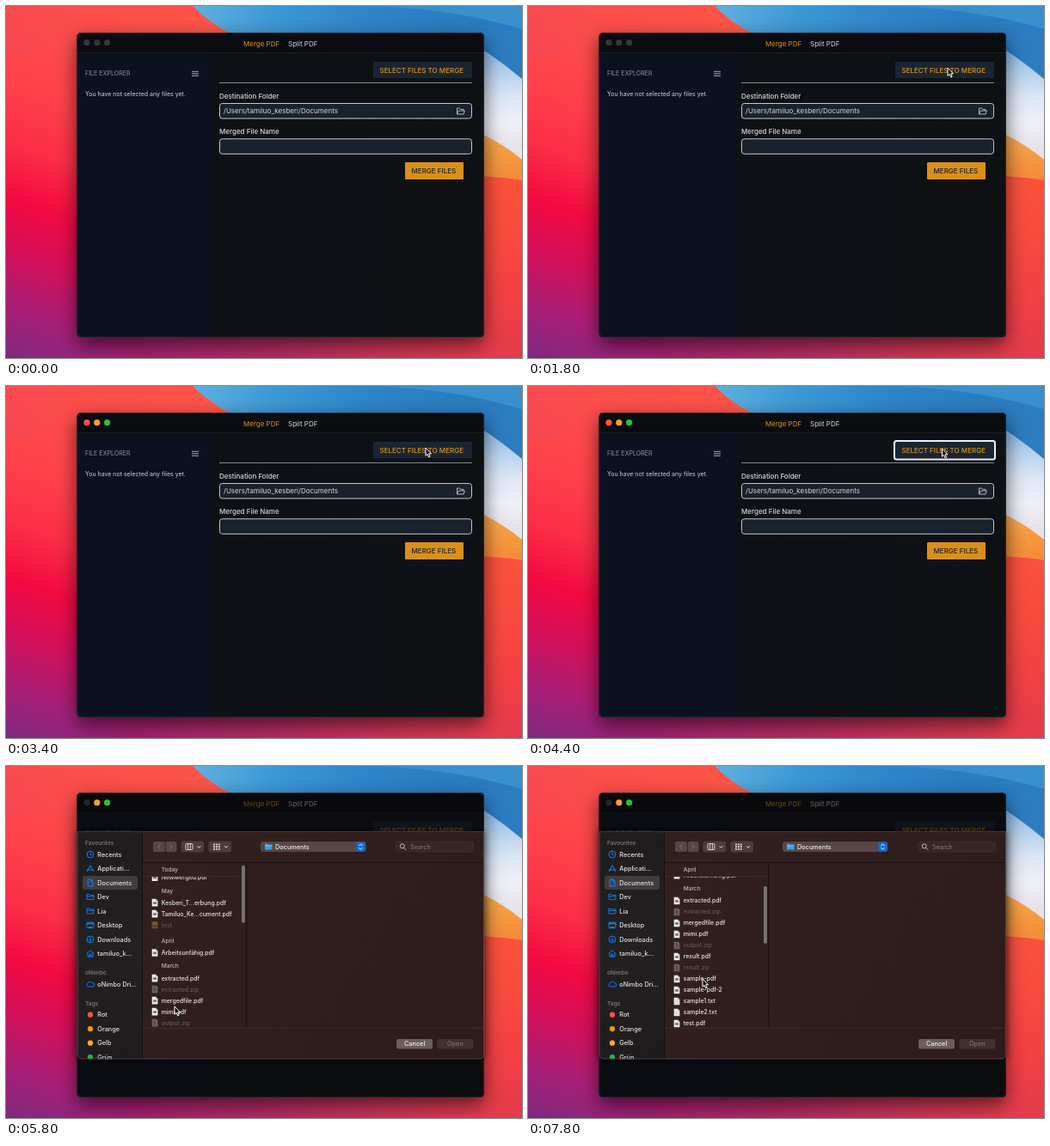
Write an HTML page with a canvas that moves like this. It is 600 by 410 pixels and loops after 8 s.

```html
<!DOCTYPE html>
<html lang="en">
<head>
<meta charset="utf-8">
<title>Merge PDF</title>
<style>
html, body { margin: 0; width: 100%; height: 100%; overflow: hidden; background: #000; }
canvas { display: block; width: 600px; height: 410px; }
</style>
</head>
<body>
<canvas id="stage" width="600" height="410"></canvas>
<script>
const c = document.getElementById('stage').getContext('2d');
const LOOP = 8000, STEP = 200;
const BLUE = '#0a84ff', AMBER = '#dc941c';
const WIN = [82.5, 31, 473.5, 355], SHEET = [82.5, 76, 473.5, 265.5];

// ---- helpers ----
function text(s, x, y, size, color, weight = 400) {
  c.font = `${weight} ${size}px Inter, "Noto Sans", sans-serif`;
  c.fillStyle = color;
  c.fillText(s, x, y + size * 0.36);
}
function box(x, y, w, h, r, fill, stroke, lw = 1) {
  c.beginPath();
  c.roundRect(x, y, w, h, r);
  if (fill) { c.fillStyle = fill; c.fill(); }
  if (stroke) { c.strokeStyle = stroke; c.lineWidth = lw; c.stroke(); }
}
function line(color, lw, ...p) {
  c.beginPath();
  for (let i = 0; i < p.length; i += 2) c.lineTo(p[i], p[i + 1]);
  c.strokeStyle = color;
  c.lineWidth = lw;
  c.stroke();
}
function dot(x, y, r, fill) {
  c.beginPath();
  c.arc(x, y, r, 0, 7);
  c.fillStyle = fill;
  c.fill();
}
function shape(path, fill, stroke, lw) {
  const p = new Path2D(path);
  if (fill) { c.fillStyle = fill; c.fill(p); }
  if (stroke) { c.strokeStyle = stroke; c.lineWidth = lw; c.stroke(p); }
}
function grad(x0, y0, x1, y1, ...colors) {
  const g = c.createLinearGradient(x0, y0, x1, y1);
  colors.forEach((k, i) => g.addColorStop(i / (colors.length - 1), k));
  return g;
}
function clipped(x, y, w, h, r, draw) {
  c.save();
  c.beginPath();
  c.roundRect(x, y, w, h, r);
  c.clip();
  draw();
  c.restore();
}
function at(x, y, draw) {
  c.save();
  c.translate(x, y);
  draw();
  c.restore();
}

// keys: [time, ...values]; eased between neighbours
function track(keys, t) {
  if (t <= keys[0][0]) return keys[0].slice(1);
  for (let i = 1; i < keys.length; i++) {
    const a = keys[i - 1], b = keys[i];
    if (t < b[0]) {
      const k = (t - a[0]) / (b[0] - a[0]), e = k * k * (3 - 2 * k);
      return a.slice(1).map((v, j) => v + (b[j + 1] - v) * e);
    }
  }
  return keys[keys.length - 1].slice(1);
}

// ---- wallpaper ----
function wallpaper() {
  c.fillStyle = grad(100, 0, -40, 400, '#fc5048', '#fd4a49', '#fd404a', '#fb2e47', '#f30a41', '#d20f5b', '#a61f76', '#7c2a80');
  c.fillRect(0, 0, 600, 410);
  c.fillStyle = grad(0, 0, 270, 0, 'rgba(240,70,96,.35)', 'rgba(252,80,76,.1)', 'rgba(255,98,64,.45)');
  c.fillRect(0, 0, 270, 60);
  c.fillStyle = grad(84, 0, 556, 0, 'rgba(150,32,112,0)', '#a8266c', '#b62c62', '#cc3557', '#e33b4c');
  c.fillRect(84, 370, 472, 40);
  c.fillStyle = grad(0, 190, 0, 410, '#fa533c', '#f94a3e', '#f34043', '#e33b4c');
  c.fillRect(555, 180, 45, 230);
  shape('M500 120 Q560 142 600 178 V203 Q575 198 500 196 Z', grad(0, 145, 0, 203, '#f9ae5c', '#f59a3e', '#f48a3a'));
  shape('M218 0 Q236 20 270 36 H500 V130 Q560 145 600 179 V0 Z', grad(0, 50, 0, 165, '#86b7e4', '#b9d2ee', '#dde7f5', '#eef0f7', '#e6e2ea'));
  shape('M218 0 Q236 20 270 36 H530 Q566 56 600 85 V0 Z', grad(218, 0, 600, 40, '#5fb0e0', '#3c98d4', '#2f86c9', '#2a7dc1', '#2c7cc0'));
  shape('M430 0 Q530 5 600 27 V0 Z', '#3a90cd');
}

// ---- app window ----
function windowFrame() {
  c.save();
  c.shadowColor = 'rgba(0,0,0,.6)';
  c.shadowBlur = 22;
  c.shadowOffsetY = 8;
  box(...WIN, 5, '#0d1116');
  c.restore();
}
function lights(colors) {
  colors.forEach((k, i) => dot(94 + i * 11.8, 42.7, 3.6, k));
}
function app(focus) {
  clipped(...WIN, 5, () => {
    c.fillStyle = grad(239, 0, 555, 0, '#0d1116', '#0e1114');
    c.fillRect(...WIN);
    c.fillStyle = '#0b111e';
    c.fillRect(82, 54, 157, 332);
    c.fillStyle = '#0a0c10';
    c.fillRect(82, 31, 474, 23);
    line('#1a1d22', 1, 82, 54.5, 556, 54.5);
  });
  text('Merge PDF', 276, 44.3, 8, AMBER);
  text('Split PDF', 328, 44.3, 8, '#d6d8da');

  text('FILE EXPLORER', 92, 78.9, 7.1, '#8c929a');
  for (const y of [76.3, 78.8, 81.3]) line('#a5abb2', 1, 216, y, 224, y);
  text('You have not selected any files yet.', 92, 102, 7, '#d2d5d9');

  box(427, 65, 115, 19, 1, '#1b2532');
  if (focus) box(426, 64, 117, 21.5, 2.5, null, '#eef1f5', 2);
  text('SELECT FILES TO MERGE', 434.5, 74.7, 8, AMBER, 500);
  line('#85888a', 1, 248, 89.5, 542, 89.5);

  text('Destination Folder', 248, 105, 8, '#d6d8da', 500);
  box(248.5, 113.5, 293, 17.5, 3, '#19212c', '#c3c8cd');
  text('/Users/tamiluo_kesberi/Documents', 253, 122.6, 8, '#d6d9dc');
  shape('M524.5 126 V119 H527.5 L528.7 120.4 H532 V122 M524.5 126 L526.3 122 H533.4 L532 126 Z', null, '#bfc5cb', 0.9);

  text('Merged File Name', 248, 146.5, 8, '#d6d8da', 500);
  box(248.5, 154.8, 293, 17.5, 3, '#19212c', '#c3c8cd');

  box(464, 182, 68, 20, 1, '#d9901b');
  text('MERGE FILES', 471.5, 192.2, 8, '#20201c', 500);
}
function border() {
  box(83, 31.5, 472.5, 354, 5, null, 'rgba(150,155,165,.2)', 0.8);
}

// ---- file sheet ----
const icons = {
  clock() { icons.ring(); line(BLUE, 1, 0, -2.3, 0, 0.4, 1.8, 0.4); },
  apps() { line(BLUE, 1, -3.6, 3.5, 0, -3.8, 3.6, 3.5); line(BLUE, 1, -4.2, 1.4, 4.2, 1.4); },
  page() { shape('M-2.8 -4 H0.8 L3 -1.8 V4 H-2.8 Z M0.6 -4 V-1.6 H3', null, BLUE, 1); },
  folder() { shape('M-4 3 V-3 H-1 L0 -2 H4 V3 Z M-4 -0.6 H4', null, BLUE, 0.9); },
  desktop() { box(-4, -3.4, 8, 6.6, 1, null, BLUE); line(BLUE, 1.2, -4, -1.8, 4, -1.8); line(BLUE, 1.4, -2, 2.2, 2, 2.2); },
  down() { icons.ring(); line(BLUE, 1, 0, -2.2, 0, 2); line(BLUE, 1, -1.6, 0.5, 0, 2.1, 1.6, 0.5); },
  ring() { c.beginPath(); c.arc(0, 0, 3.9, 0, 7); c.stroke(); },
  home() { shape('M-4.2 0 L0 -3.8 L4.2 0 M-3 -0.8 V3.6 H3 V-0.8 M-0.9 3.6 V1 H0.9 V3.6', null, BLUE, 1); },
  cloud() { shape('M-2.6 3 A2.1 2.1 0 0 1 -2.7 -1 A2.9 2.9 0 0 1 2.6 -1.2 A2.1 2.1 0 0 1 2.6 3 Z', null, BLUE, 1); }
};
const places = [
  ['clock', 'Recents', 103], ['apps', 'Applicati...', 119.5], ['page', 'Documents', 136],
  ['folder', 'Dev', 152.5], ['folder', 'Lia', 169], ['desktop', 'Desktop', 185.5],
  ['down', 'Downloads', 202], ['home', 'tamiluo_k...', 218.5], ['cloud', 'oNimbo Dri...', 254]
];
const tags = [['Rot', '#ff5149'], ['Orange', '#f5950c'], ['Gelb', '#ffa82c'], ['Grün', '#27b640']];

function sidebar() {
  c.fillStyle = grad(0, 76, 0, 341, '#1f1c1f', '#232021', '#1f1c1f');
  c.fillRect(82, 76, 76, 266);
  line('#120d0e', 1, 158.5, 76, 158.5, 342);
  text('Favourites', 92, 89.8, 6.6, '#7b7577', 600);
  text('oNimbo', 92, 241, 6.6, '#7b7577', 600);
  text('Tags', 92, 276.3, 6.6, '#7b7577', 600);
  box(89, 128, 64, 16, 3, '#413d3f');
  for (const [icon, name, y] of places) {
    at(98, y, () => { c.strokeStyle = BLUE; c.lineWidth = 1; icons[icon](); });
    text(name, 106.3, y, 7.3, '#e6e3e3', 500);
  }
  tags.forEach(([name, color], i) => {
    const y = 289.7 + i * 16.5;
    dot(98, y, 3.1, color);
    text(name, 106.3, y, 7.3, '#e6e3e3', 500);
  });
}

const PIN = 121;
const sections = [
  ['Today', PIN, 139.5, ['NewMerged.pdf']],
  ['May', 155.3, 169, ['Kesberi_T...erbung.pdf', 'Tamiluo_Ke...cument.pdf', 'test']],
  ['April', 213.3, 227.3, ['Arbeitsunfähig.pdf']],
  ['March', 243, 257, ['extracted.pdf', 'extracted.zip', 'mergedfile.pdf', 'mimi.pdf', 'output.zip',
    'result.pdf', 'result.zip', 'sample-pdf', 'sample-pdf-2', 'sample1.txt', 'sample2.txt', 'test.pdf']]
];

function fileIcon(name, y) {
  at(173, y, () => {
    if (name === 'test') {
      box(-3.5, -4, 7, 8, 0.5, '#6b5426');
      line('#3c2a1c', 0.9, -3.5, 1.5, 3.5, 1.5);
      line('#92783a', 0.9, -2.5, -2, 2.5, -2);
      return;
    }
    const zip = name.endsWith('.zip');
    shape('M-3.3 -4.3 H1.2 L3.4 -2 V4.3 H-3.3 Z', zip ? '#6c6061' : '#eeecec');
    shape('M1.2 -4.3 V-2 H3.4 Z', zip ? '#8a7e7e' : '#b3b0b1');
    if (zip) line('#413130', 1, 0, -3, 0, 2.6);
    else if (name.endsWith('.txt')) for (const k of [-1, 0.7, 2.4]) line('#b9b5b5', 0.6, -2, k, 2.2, k);
    else { c.fillStyle = '#686b78'; c.fillRect(-1.8, -0.8, 3.7, 2.5); }
  });
}

function list(scroll) {
  const header = (title, y) => text(title, 180.7, y, 6.5, '#b2a8a7', 600);
  clipped(159, 129, 120, 177, 0, () => {
    for (const [title, headY, rowY, files] of sections) {
      header(title, headY - scroll);
      files.forEach((name, i) => {
        const y = rowY + i * 13 - scroll;
        fileIcon(name, y);
        const dim = name === 'test' || name.endsWith('.zip');
        text(name, 180.7, y, 6.9, dim ? '#64575a' : '#ece8e8', 500);
      });
    }
  });
  // the newest section that passed the top stays pinned
  const pinned = sections.filter(s => s[1] - scroll <= PIN).pop();
  header(pinned[0], PIN);
  line('#463432', 0.8, 159, 128.7, 279, 128.7);
  if (scroll > 0) box(274, 113 + scroll * 0.27, 4, 67, 2, '#786f70');
}

function chevron(x, y) {
  line('#e8e3e3', 1, x - 1.9, y - 1, x, y + 1, x + 1.9, y - 1);
}
function toolbar() {
  box(171, 88, 14, 12, 2.5, '#554746');
  box(185.5, 88, 13, 12, 2.5, '#554746');
  line('#3a2827', 0.8, 185.2, 88, 185.2, 100);
  line('#857877', 1, 179.2, 91.3, 176.7, 94, 179.2, 96.7);
  line('#857877', 1, 190.8, 91.3, 193.3, 94, 190.8, 96.7);

  box(203.5, 87.5, 26.5, 13, 2.5, '#4c3c3b');
  box(209, 90.5, 8, 7, 1, null, '#e8e3e3', 0.9);
  line('#e8e3e3', 0.9, 211.7, 90.5, 211.7, 97.5);
  line('#e8e3e3', 0.9, 214.4, 90.5, 214.4, 97.5);
  chevron(224.5, 94.2);

  box(235.5, 87.5, 26.5, 13, 2.5, '#4c3c3b');
  c.fillStyle = '#dcd6d6';
  for (let i = 0; i < 9; i++) c.fillRect(241 + (i % 3) * 2.9, 90.5 + Math.floor(i / 3) * 2.7, 2, 1.8);
  chevron(256, 94.2);

  box(296, 88, 122.5, 12, 3, '#564746');
  shape('M301 97.5 V90.5 H304 L305 91.6 H309.5 V97.5 Z', '#2fa4ea');
  line('#7fcdf8', 0.8, 301, 93, 309.5, 93);
  text('Documents', 313, 94, 7.3, '#f0ecec', 500);
  box(407.5, 88.8, 10, 10.4, 2.5, '#0b6fe0');
  line('#fff', 1, 410.5, 92.9, 412.5, 90.9, 414.5, 92.9);
  line('#fff', 1, 410.5, 95.2, 412.5, 97.2, 414.5, 95.2);

  box(453.5, 88, 90, 12, 3, '#362625', '#433130', 0.8);
  c.beginPath();
  c.arc(460.8, 93.3, 2.5, 0, 7);
  c.strokeStyle = '#c9c1c0';
  c.lineWidth = 1;
  c.stroke();
  line('#c9c1c0', 1, 462.6, 95.2, 465, 97.7);
  text('Search', 470, 94, 7.2, '#857978');
}

function sheet(scroll) {
  const corners = [0, 0, 5, 5];
  clipped(...WIN, 5, () => {
    c.fillStyle = 'rgba(10,9,10,.55)';
    c.fillRect(...WIN);
  });
  lights(['#24272a', '#f5a32b', '#27c13f']);
  c.save();
  c.shadowColor = 'rgba(0,0,0,.6)';
  c.shadowBlur = 8;
  box(...SHEET, corners, '#301e1e');
  c.restore();
  clipped(...SHEET, corners, () => {
    c.fillStyle = grad(158, 76, 555, 341, '#321f1e', '#301e1d', '#2e1c1c');
    c.fillRect(158, 76, 398, 266);
    sidebar();
    toolbar();
    line('#1d1010', 1, 159, 112.5, 556, 112.5);
    list(scroll);
    line('#1d1010', 1, 279.7, 113, 279.7, 305);
    line('#443130', 0.8, 159, 305.3, 556, 305.3);
    box(454, 318, 42, 11.5, 2.5, '#6b5d5c');
    text('Cancel', 463, 323.8, 7.3, '#f4f0f0', 500);
    box(501.5, 318, 42, 11.5, 2.5, '#423030');
    text('Open', 513, 323.8, 7.3, '#7e706f', 500);
  });
  box(83, 76.4, 472.5, 264.6, corners, null, '#494243', 0.8);
}

// ---- pointer ----
const path = [
  [1000, 612, 130], [1600, 488, 72], [3600, 488, 72], [4000, 481.5, 73], [4600, 481.5, 73],
  [5000, 279, 168], [5200, 279, 168], [5800, 196, 280], [6800, 196, 280], [7400, 203, 248]
];
const scrolls = [[5600, 0], [6400, 63], [6800, 63], [7600, 100]];

function pointer(t) {
  const [x, y] = track(path, t);
  at(x, y, () => {
    c.lineJoin = 'round';
    if (t >= 5000 && t <= 5200) {
      const cross = 'M0 -4.6 L1.9 -2.3 H0.7 V-0.7 H2.3 V-1.9 L4.6 0 L2.3 1.9 V0.7 H0.7 V2.3 H1.9 L0 4.6 ' +
        'L-1.9 2.3 H-0.7 V0.7 H-2.3 V1.9 L-4.6 0 L-2.3 -1.9 V-0.7 H-0.7 V-2.3 H-1.9 Z';
      shape(cross, null, '#fff', 1.5);
      shape(cross, '#111');
    } else {
      const arrow = 'M0 0 V9.2 L2.1 7.3 L3.6 10.8 L5.1 10.1 L3.7 6.8 H6.5 Z';
      shape(arrow, '#0a0a0a', '#fff', 1);
    }
  });
}

function draw(now) {
  const t = Math.floor((now % LOOP) / STEP) * STEP;
  const open = t >= 4800;
  wallpaper();
  windowFrame();
  app(t >= 4000 && !open);
  if (open) sheet(track(scrolls, t)[0]);
  else lights(t >= 2600 ? ['#ff5149', '#f5a32b', '#27c13f'] : ['#34373a', '#34373a', '#34373a']);
  border();
  if (t >= 1000) pointer(t);
}

const start = performance.now();
function tick() {
  draw(performance.now() - start);
  requestAnimationFrame(tick);
}
tick();
</script>
</body>
</html>
```
